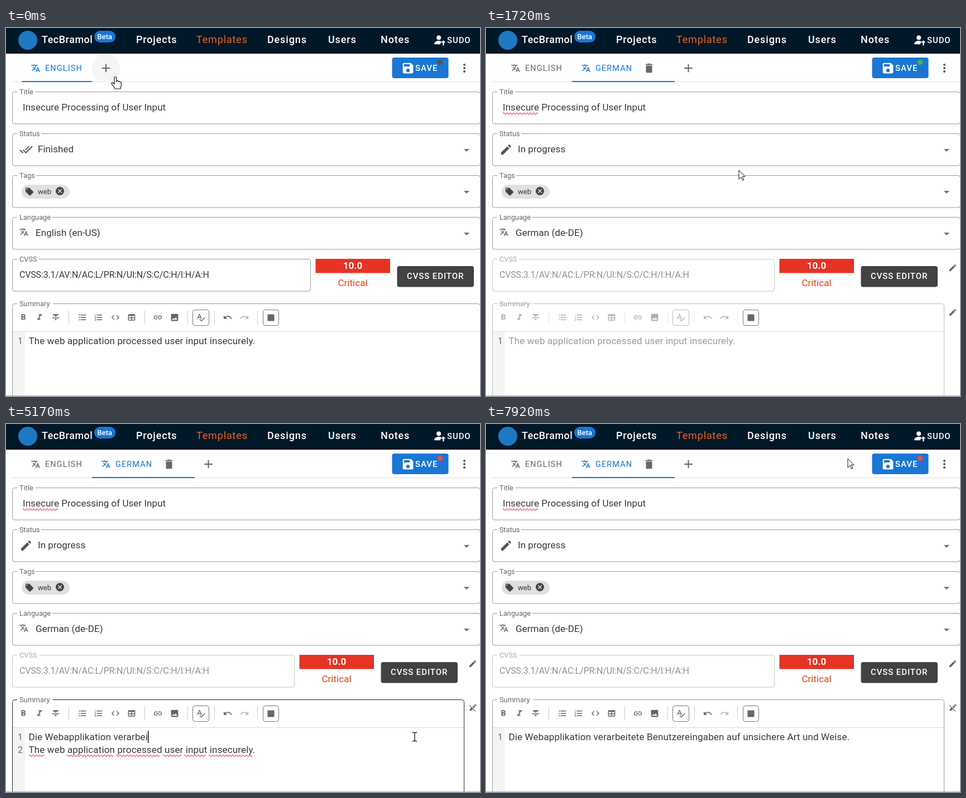
An HTML page for the animation above (7.99 s loop, 849x660 px).

```html
<!DOCTYPE html>
<html lang="en">
<head>
<meta charset="utf-8">
<title>Template translation</title>
<style>
  html, body { margin: 0; width: 100%; height: 100%; overflow: hidden; background: #fff; }
  svg { display: block; width: 849px; height: 660px; }
  text { font: 17.1px Roboto, "Liberation Sans", sans-serif; fill: #383838; white-space: pre; }
  .nav { font-size: 18px; font-weight: 500; letter-spacing: .85px; fill: #fff; }
  .tab { font-size: 14.5px; letter-spacing: 1.1px; fill: inherit; }
  .btn { font-size: 15px; font-weight: 500; letter-spacing: .9px; fill: #fff; }
  .label { font-size: 12.8px; fill: #666; }
  .score { font-weight: 700; fill: #fff; text-anchor: middle; }
  .critical { fill: #dc4418; text-anchor: middle; }
  .vector { font-size: 16px; letter-spacing: -.17px; }
  .code { letter-spacing: .1px; }
  .num { font-size: 16px; fill: #6c6c6c; }
  .tip { font-size: 15.1px; font-weight: 500; fill: #fff; }
  .box { fill: none; stroke: #999; }
  .wave { fill: none; stroke: #e8384f; stroke-width: 1.1; }
</style>
</head>
<body>
<svg id="stage" viewBox="0 0 849 660"></svg>
<script>
const LOOP = 7990, PANE = 838;
const ENGLISH = 'The web application processed user input insecurely.';
const GERMAN = 'Die Webapplikation verarbeitete Benutzereingaben auf unsichere Art und Weise.';

// Icons on a 24 unit grid
const dot = (x, y, r) => `M${x - r} ${y}a${r} ${r} 0 1 0 ${2 * r} 0a${r} ${r} 0 1 0 ${-2 * r} 0`;
const ICON = {
  lang: 'M12.87 15.07l-2.54-2.51.03-.03c1.74-1.94 2.98-4.17 3.71-6.53H17V4h-7V2H8v2H1v1.99h11.17C11.5 7.92 10.44 9.75 9 11.35 8.07 10.32 7.3 9.19 6.69 8h-2c.73 1.63 1.73 3.17 2.98 4.56l-5.09 5.02L4 19l5-5 3.11 3.11.76-2.04zM18.5 10h-2L12 22h2l1.12-3h4.75L21 22h2l-4.5-12zm-2.62 7l1.62-4.33L19.12 17z',
  plus: 'M19 13h-6v6h-2v-6H5v-2h6V5h2v6h6z',
  save: 'M15 9H5V5H15M12 19A3 3 0 0 1 12 13A3 3 0 0 1 12 19M17 3H5A2 2 0 0 0 3 5V19A2 2 0 0 0 5 21H19A2 2 0 0 0 21 19V7Z',
  sync: 'M12 18A6 6 0 0 1 6 12C6 11 6.25 10.03 6.7 9.2L5.24 7.74A7.93 7.93 0 0 0 4 12A8 8 0 0 0 12 20V23L16 19L12 15M12 4V1L8 5L12 9V6A6 6 0 0 1 18 12C18 13 17.75 13.97 17.3 14.8L18.76 16.26A7.93 7.93 0 0 0 20 12A8 8 0 0 0 12 4Z',
  trash: 'M19 4H15.5L14.5 3H9.5L8.5 4H5V6H19M6 19A2 2 0 0 0 8 21H16A2 2 0 0 0 18 19V7H6Z',
  more: dot(12, 6, 2) + dot(12, 12, 2) + dot(12, 18, 2),
  pencil: 'M20.71 7.04C21.1 6.65 21.1 6 20.71 5.63L18.37 3.29C18 2.9 17.35 2.9 16.96 3.29L15.12 5.12L18.87 8.87M3 17.25V21H6.75L17.81 9.93L14.06 6.18Z',
  pencilOff: 'M18.66 2C18.4 2 18.16 2.09 17.97 2.28L16.13 4.13L19.88 7.88L21.72 6.03C22.11 5.64 22.11 5 21.72 4.63L19.38 2.28C19.18 2.09 18.91 2 18.66 2M3.28 4L2 5.28L8.5 11.75L4 16.25V20H7.75L12.25 15.5L18.72 22L20 20.72M15.06 5.19L11.03 9.22L14.78 12.97L18.81 8.94Z',
  done: 'M.41 13.41L6 19L7.41 17.58L1.83 12M22.24 5.58L11.66 16.17L7.5 12L6.07 13.41L11.66 19L23.66 7M18 7L16.59 5.58L10.24 11.93L11.66 13.34Z',
  tag: dot(5.5, 5.5, 1.5) + 'M21.4 11.6L12.4 2.6Q11.8 2 11 2H4Q2 2 2 4V11Q2 11.8 2.6 12.4L11.6 21.4Q13 22.6 14.4 21.4L21.4 14.4Q22.6 13 21.4 11.6Z',
  close: dot(12, 12, 10) + 'M17 15.6L15.6 17 12 13.4 8.4 17 7 15.6 10.6 12 7 8.4 8.4 7 12 10.6 15.6 7 17 8.4 13.4 12Z',
  bold: 'M13.5 15.5H10V12.5H13.5A1.5 1.5 0 0 1 13.5 15.5M10 6.5H13A1.5 1.5 0 0 1 13 9.5H10M15.6 10.8C16.6 10.1 17.25 9 17.25 8C17.25 5.7 15.5 4 13.25 4H7V18H14C16.1 18 17.75 16.3 17.75 14.2C17.75 12.7 16.9 11.4 15.6 10.8Z',
  italic: 'M10 4V7H12.2L8.8 15H6V18H14V15H11.8L15.2 7H18V4Z',
  strike: 'M3 14H21V12H3M5 4V7H10V10H14V7H19V4M10 19H14V16H10Z',
  list: 'M7 5H21V7H7M7 13V11H21V13M7 19V17H21V19' + dot(4, 6, 1.5) + dot(4, 12, 1.5) + dot(4, 18, 1.5),
  numbers: 'M7 13V11H21V13M7 19V17H21V19M7 7V5H21V7M3 8V5H2V4H4V8M2 17V16H5V20H2V19H4V18.5H3V17.5H4V17M2 10H5V11L3.2 13H5V14H2V13L4 11H2',
  code: 'M14.6 16.6L19.2 12 14.6 7.4 16 6l6 6-6 6M9.4 16.6L4.8 12 9.4 7.4 8 6l-6 6 6 6',
  table: 'M5 4H19A2 2 0 0 1 21 6V18A2 2 0 0 1 19 20H5A2 2 0 0 1 3 18V6A2 2 0 0 1 5 4M5 8V12H11V8M13 8V12H19V8M5 14V18H11V14M13 14V18H19V14',
  link: 'M3.9 12A3.1 3.1 0 0 1 7 8.9H11V7H7A5 5 0 0 0 7 17H11V15.1H7A3.1 3.1 0 0 1 3.9 12M8 13H16V11H8M17 7H13V8.9H17A3.1 3.1 0 0 1 17 15.1H13V17H17A5 5 0 0 0 17 7Z',
  image: 'M8.5 13.5L11 16.5L14.5 12L19 18H5M21 19V5A2 2 0 0 0 19 3H5A2 2 0 0 0 3 5V19A2 2 0 0 0 5 21H19A2 2 0 0 0 21 19Z',
  spell: 'M21.6 11.6L13.5 19.7 9.8 16 8.4 17.4 13.5 22.5 23 13M6.4 11L8.5 5.5 10.6 11M12.45 16H14.5L9.4 3H7.6L2.5 16H4.5L5.7 13H11.3Z',
  undo: 'M12.5 8C9.85 8 7.45 9 5.6 10.6L2 7V16H11L7.4 12.4C8.8 11.2 10.5 10.5 12.5 10.5C16 10.5 19 12.8 20.1 16L22.5 15.2C21.1 11 17.15 8 12.5 8Z',
  redo: 'M18.4 10.6C16.55 9 14.15 8 11.5 8C6.85 8 2.9 11 1.5 15.2L3.9 16C4.95 12.8 7.95 10.5 11.5 10.5C13.45 10.5 15.2 11.2 16.6 12.4L13 16H22V7Z',
  user: dot(10, 7, 4.5) + 'M1 20C1 12 14 12 15.5 15L13 18V20ZM19 12L23.5 16.5H20.3V22H17.7V16.5H14.5Z'
};

const icon = (name, cx, cy, size = 24, fill = '#666', extra = '') =>
  `<path d="${ICON[name]}" fill="${fill}" fill-rule="evenodd" transform="translate(${cx - size / 2} ${cy - size / 2}) scale(${size / 24})" ${extra}/>`;
const text = (x, y, s, cls = '', extra = '') => `<text x="${x}" y="${y}" class="${cls}" ${extra}>${s}</text>`;
const rect = (x, y, w, h, fill, r = 0, extra = '') =>
  `<rect x="${x}" y="${y}" width="${w}" height="${h}" rx="${r}" fill="${fill}" ${extra}/>`;
const group = (id, body, extra = '') => `<g id="${id}" ${extra}>${body}</g>`;
const wave = (x1, x2, y) => `<path class="wave" d="M${x1} ${y}q1.5 -3 3 0${'t3 0'.repeat((x2 - x1) / 3 - 1)}"/>`;

function field(label, y, notch, right = 849.5, bottom = y + 58, id = '') {
  return `<rect class="box" ${id && `id="${id}Box"`} x="11.5" y="${y + .5}" width="${right - 11.5}" height="${bottom - y - .5}" rx="4"/>
    <g ${id && `id="${id}Label"`}>${rect(20, y - 2, notch, 5, '#fff')}${text(24, y + 5, label, 'label')}</g>`;
}
const arrow = y => `<path d="M820 ${y}h10l-5 5z" fill="#707070"/>`;

function toolbar(id) {
  const names = ['bold', 'italic', 'strike', 'list', 'numbers', 'code', 'table', 'link', 'image'];
  const xs = [31, 60, 89, 137, 166, 196, 225, 272, 302];
  return group(id + 'Tools',
      names.map((n, i) => icon(n, xs[i], 519, 17)).join('') +
      [112, 248, 325, 373, 450].map(x => rect(x, 507, 1, 24, '#ccc')).join('') +
      '<rect class="box" x="334.5" y="505.5" width="29" height="28" rx="4" style="stroke:#777"/>' +
      icon('spell', 349, 519, 17)) +
    icon('undo', 397, 519, 17, '#666', `id="${id}Undo"`) + icon('redo', 427, 519, 17, '#bbb') +
    '<rect class="box" x="460.5" y="505.5" width="28" height="28" rx="4" style="stroke:#777"/>' +
    rect(468.5, 513.5, 12, 12, '#666', 1);
}

function pane(id, o) {
  const dx = o.inherited ? -29 : 0, side = o.inherited ? 820.5 : 849.5;
  return group(id,
    field('Title', 114, 33, 849.5, 172, id + 'Title') + text(30, 148, 'Insecure Processing of User Input') +
    field('Status', 189, 43) + icon(o.statusIcon, 36, 218, 24, '#555') + text(57, 223, o.status) + arrow(217) +
    field('Tags', 264, 33) + rect(28, 281, 86, 25, '#e0e0e0', 12.5) + icon('tag', 42, 293.5, 17, '#444') +
    text(57, 298, 'web', '', 'style="font-size:13px"') + icon('close', 96.5, 292.5, 18, '#444') + arrow(292) +
    field('Language', 339, 63, 849.5, 397, id + 'Lang') + icon('lang', 32, 366, 17) + text(53, 373, o.lang) + arrow(367) +
    `<g opacity="${o.inherited ? .55 : 1}">` + field('CVSS', 414, 39, 545.5 + dx, 472) +
    text(24, 448, 'CVSS:3.1/AV:N/AC:L/PR:N/UI:N/S:C/C:H/I:H/A:H', 'vector') + '</g>' +
    rect(554.5 + dx, 414, 133.5, 25.5, '#e73323') + text(621 + dx, 432, '10.0', 'score') +
    text(621 + dx, 463, 'Critical', 'critical') +
    rect(700.5 + dx, 427, 137.5, 37.5, '#424242', 4) + text(718 + dx, 450, 'CVSS EDITOR', 'btn') +
    rect(12, 545, 22, 115, '#f4f4f4') + rect(12, 544, side - 12, 1, '#ddd') +
    field('Summary', 494, 64, side, 680, id + 'Sum') + toolbar(id) +
    text(21, 567, '1', 'num') + (o.body || text(40.5, 566.5, ENGLISH, 'code')));
}

const misspelt = [[41, 69], [109, 193], [197, 276], [281, 315], [319, 359], [363, 441]];
const germanBody =
  text(40.5, 566.5, '', 'code', 'id="typed"') +
  rect(41, 573, 0, 23, '#b4d5fe', 0, 'id="selection"') +
  group('second', text(40.5, 566.5, ENGLISH, 'code') + group('waves', misspelt.map(w => wave(...w, 572)).join(''))) +
  text(21, 590, '2', 'num', 'id="two"') +
  rect(0, 0, 1.5, 22, '#111', 0, 'id="caret"') +
  group('titleWave', wave(30, 95, 153.5)) +
  icon('pencil', 836, 430, 16) + icon('pencil', 836, 510, 16, '#666', 'id="override"') +
  icon('pencilOff', 836, 509, 16, '#666', 'id="revert"');

const languages = ['German (de-DE)', 'Spanish (es-ES)', 'French (fr-FR)', 'Portuguese (pt-PT)', 'Italian (it-IT)', 'Dutch (nl-NL)', 'Danish (da-DK)'];
const nav = [[233, 'Projects'], [468, 'Designs'], [577, 'Users'], [671, 'Notes']];

stage.innerHTML =
  `<defs><clipPath id="paneClip"><path d="M11 97H849V660H11z"/></clipPath>
   <clipPath id="menuClip"><path d="M153 96H382V382H153z"/></clipPath>
   <filter id="shadow" x="-20%" y="-20%" width="140%" height="140%"><feDropShadow dx="0" dy="4" stdDeviation="4" flood-opacity=".35"/></filter></defs>` +
  rect(0, 0, 849, 660, '#fff') + rect(0, 0, 849, 46, '#001827') +
  '<circle cx="39" cy="22" r="17" fill="#1f78c4"/>' +
  text(64, 27, 'TecBramol', 'nav', 'style="letter-spacing:.5px"') +
  rect(158, 5, 38, 21, '#1976d2', 10.5) + text(163.5, 20, 'Beta', '', 'style="font-size:13px;font-weight:500;fill:#fff"') +
  nav.map(([x, s]) => text(x, 27, s, 'nav')).join('') +
  text(341, 27, 'Templates', 'nav', 'style="fill:#e86428;font-weight:400"') +
  icon('user', 777, 22, 22, '#fff') + text(790, 27, 'SUDO', 'btn') +
  rect(11, 96, 838, 1, '#ddd') +
  '<circle id="hover" cx="179" cy="72" r="25" fill="#f5f5f5"/>' +
  group('tabEn', icon('lang', 53, 72, 17, 'inherit') + text(70, 77, 'ENGLISH', 'tab')) +
  group('tabDe', icon('lang', 179, 72, 17, '#1976d2') + text(196, 77, 'GERMAN', 'tab') + icon('trash', 292, 72, 22), 'fill="#1976d2"') +
  group('add', icon('plus', 179, 72, 25)) +
  rect(28, 95, 126, 2, '#1976d2', 0, 'id="slider"') +
  rect(691.5, 53, 101, 37, '#1976d2', 4, 'id="saveBox"') +
  icon('save', 720, 72, 25, '#fff', 'id="saveIcon"') +
  `<g id="sync">${icon('sync', 0, 0, 22, '#a6a6a6')}</g>` +
  text(733, 76.5, 'SAVE', 'btn', 'id="saveText"') + '<circle id="badge" cx="777.5" cy="61.5" r="4.7"/>' +
  icon('more', 821, 72, 24, '#555') +
  '<g clip-path="url(#paneClip)">' +
  pane('en', { status: 'Finished', statusIcon: 'done', lang: 'English (en-US)' }) +
  pane('de', { status: 'In progress', statusIcon: 'pencil', lang: 'German (de-DE)', inherited: true, body: germanBody }) + '</g>' +
  rect(0, 659, 849, 1, '#b5b5b5') +
  group('menu', rect(153, 96, 229, 286, '#fff', 4, 'filter="url(#shadow)"') +
    '<g clip-path="url(#menuClip)">' + rect(153, 103, 211, 50, '#f0f0f0', 0, 'id="itemHover"') +
    group('items', languages.map((s, i) => icon('lang', 178, 130 + 50 * i, 17) + text(199, 134 + 50 * i, s)).join('')) + '</g>' +
    rect(363, 98, 18, 282, '#f1f1f1') + rect(364, 116, 16, 55, '#c1c1c1') +
    '<path d="M368 109h8l-4-4zM368 369h8l-4 4z" fill="#777"/>') +
  group('tooltip', rect(460, 428, 400, 57, '#616161', 4, 'opacity=".84"') +
    text(477, 449, 'Override field in German translation.', 'tip') +
    text(477, 472, 'Currently it is inherited from the main language English.', 'tip')) +
  group('pointer', '<circle id="click" r="14" fill="#f5ee28" opacity=".8"/>' +
    '<path id="hand" d="M-2 1.5a2 2 0 0 1 4 0V8l1-.5a1.6 1.6 0 0 1 3 .8l.5-.2a1.5 1.5 0 0 1 2.4 1.2 1.5 1.5 0 0 1 1.6 1.4V15c0 2-1.5 3-1.5 6H-1c0-3-4-5.5-6-9.5 0-2 2-2.3 3.4-.5L-2 12.5Z" fill="#fff" stroke="#111" stroke-width="1.2"/>' +
    '<path id="tip" d="M0 0V16l4-3.6 2.6 5.9 2.4-1-2.6-5.8H11Z" fill="#fff" stroke="#111"/>' +
    '<path id="beam" d="M-4-8q4 0 4 2q0-2 4-2M0-6V6M-4 8q4 0 4-2q0 2 4 2" fill="none" stroke="#111" stroke-width="1.3"/>');

const $ = id => document.getElementById(id);
const set = (id, name, value) => $(id).setAttribute(name, value);
const show = (id, on) => set(id, 'visibility', on ? 'inherit' : 'hidden');
const move = (id, x, y) => set(id, 'transform', `translate(${x} ${y})`);
const within = (t, a, b) => t >= a && t < b;
const ramp = (t, a, b) => Math.min(1, Math.max(0, (t - a) / (b - a)));
const smooth = u => u * u * (3 - 2 * u);
const easeOut = u => 1 - (1 - u) ** 3;

// Keys are [time, value, ...]; values hold after the last key.
function track(keys, t, ease = u => u) {
  const i = keys.findLastIndex(k => t >= k[0]), a = keys[i], b = keys[i + 1] || a;
  const u = b === a ? 0 : ease((t - a[0]) / (b[0] - a[0]));
  return a.slice(1).map((v, n) => v + (b[n + 1] - v) * u);
}
const path = [[0, 196, 88], [70, 196, 88], [280, 181, 76], [560, 181, 76], [860, 265, 128], [1300, 265, 128],
  [2400, 839, 516], [2640, 839, 516], [2940, 300, 555], [3080, 41, 562], [3220, 41, 562], [3370, 88, 556],
  [3570, 88, 556], [3650, 97, 550], [4110, 97, 550], [4500, 732, 561], [6230, 732, 561], [6480, 650, 586],
  [6800, 448, 587], [7010, 448, 587], [7300, 38, 589], [7480, 38, 589], [7770, 600, 560], [7850, 625, 250], [7920, 648, 62]];
const typing = [[0, 0], [4110, 0], [4930, 16], [5170, 27.2], [5710, 53.5], [6160, 71.2], [6470, 77]];
const clicks = [[440, 580], [960, 1100], [2430, 2600], [3080, 3200], [6800, 6880], [7020, 7300]];

function draw(t) {
  const added = t >= 1110, edit = t >= 2600, split = t >= 3300, removed = t >= 7440;

  const slide = easeOut(ramp(t, 1198, 1498)), tab = easeOut(ramp(t, 1146, 1446));
  move('en', -PANE * slide, 0);
  move('de', PANE * (1 - slide), 0);
  show('en', slide < 1);
  show('de', slide > 0);
  set('slider', 'x', 28 + 126 * tab);
  set('slider', 'width', 126 + 58 * tab);
  set('tabEn', 'fill', added ? '#666' : '#1976d2');
  show('tabDe', added);
  move('add', added ? 183.5 : 0, 0);
  show('hover', t < 840);
  set('enTitleBox', 'style', within(t, 1190, 1500) ? 'stroke:#222' : '');
  move('deLangLabel', 20 * (1 - ramp(t, 1260, 1400)), 0);
  show('titleWave', t >= 1700);

  set('menu', 'opacity', ramp(t, 500, 620) * (1 - ramp(t, 1200, 1300)));
  move('items', 0, added ? -50 : 0);
  show('itemHover', within(t, 780, 1110));
  set('tooltip', 'opacity', ramp(t, 2360, 2460) * (1 - ramp(t, 2560, 2680)));

  const saving = within(t, 1120, 1460);
  set('saveBox', 'fill', saving ? '#e0e0e0' : '#1976d2');
  set('saveText', 'style', saving ? 'fill:#a6a6a6' : '');
  show('saveIcon', !saving);
  show('sync', saving);
  set('sync', 'transform', `translate(720 72) rotate(${(t - 1120) * .36})`);
  show('badge', !saving);
  set('badge', 'fill', edit ? '#f4483a' : t < 140 ? '#5b5048' : '#4caf50');

  // Summary editor
  const focus = edit && t < 7850, typed = GERMAN.slice(0, track(typing, t)[0]).replace(/ /g, '\u00a0');
  set('deSumBox', 'style', focus ? 'stroke:#222' : edit ? '' : 'stroke:#bbb');
  set('deSumLabel', 'opacity', edit ? 1 : .6);
  set('deTools', 'opacity', edit ? 1 : .5);
  set('deUndo', 'fill', t >= 4120 ? '#666' : '#bbb');
  show('override', !edit);
  show('revert', edit);
  set('second', 'opacity', edit ? 1 : .5);
  move('second', 0, split ? 23 : 0);
  show('second', !removed);
  show('waves', t >= 3150);
  show('two', split && !removed);
  $('typed').textContent = typed;

  const [x, y] = track(path, t, smooth);
  const left = Math.max(41, Math.min(444, x));
  show('selection', within(t, 7020, 7440));
  set('selection', 'x', left);
  set('selection', 'width', 444 - left);
  const lower = within(t, 3300, 3580) || within(t, 6800, 7440);
  const end = 40.5 + (typed ? $('typed').getComputedTextLength() : 0);
  set('caret', 'x', lower ? (t < 3580 ? 40.5 : t < 7020 ? 444 : left) : end);
  set('caret', 'y', lower ? 573 : 550);
  show('caret', within(t, 3090, 7800) && !within(t, 3860, 4120) && !within(t, 6620, 6760));

  const hand = t < 1190 || within(t, 2340, 2700);
  const beam = within(t, 1190, 1600) || within(t, 2760, 7800);
  move('pointer', x, y);
  show('hand', hand);
  show('beam', beam);
  show('tip', !hand && !beam);
  show('click', clicks.some(c => within(t, ...c)));
}

const start = performance.now();
function tick() {
  draw((performance.now() - start) % LOOP);
  requestAnimationFrame(tick);
}
tick();
</script>
</body>
</html>
```
